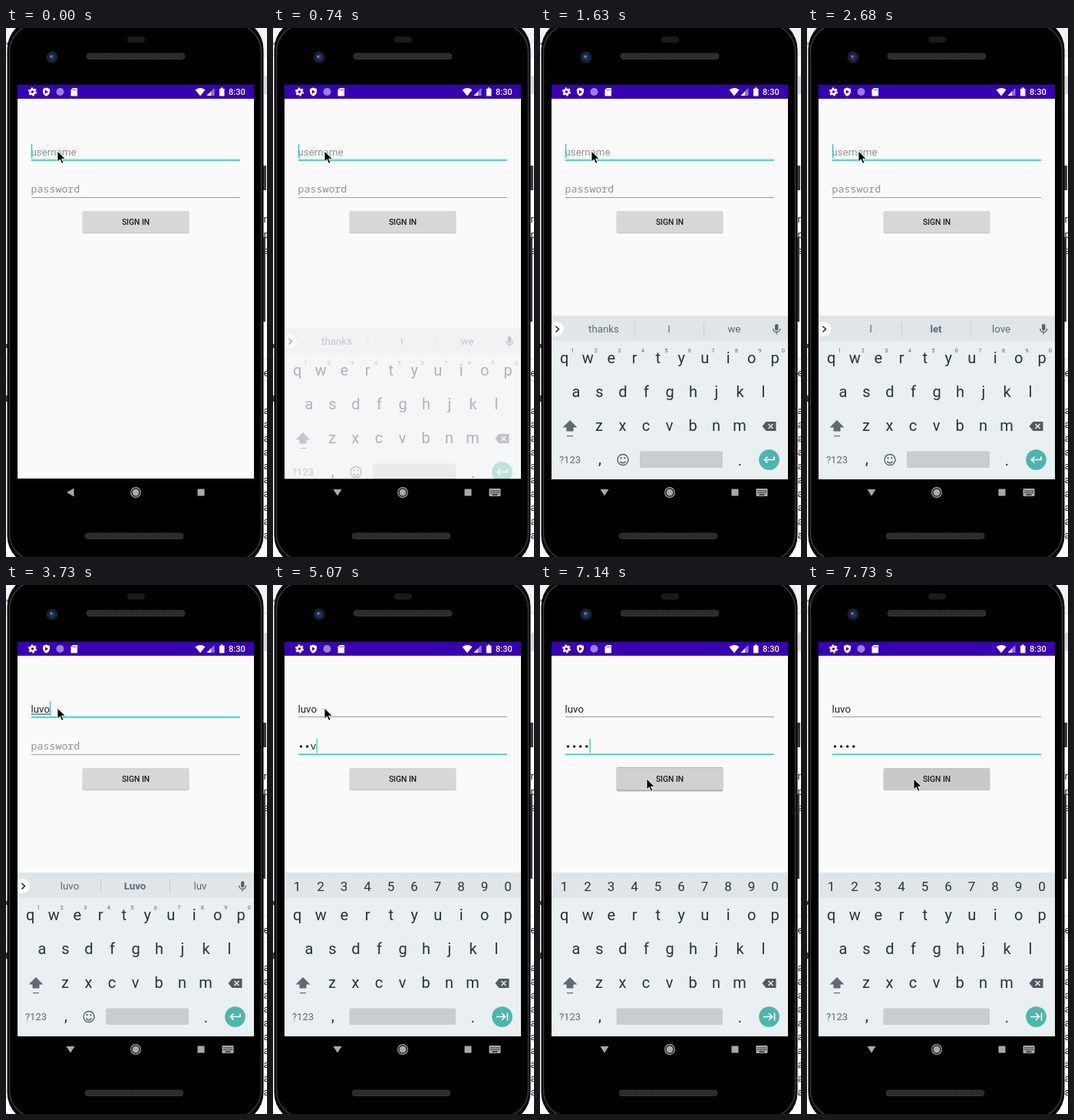
Recreate the animation shown at these times as an HTML page. Size 340 by 688 pixels, loop 8000 ms.

```html
<!DOCTYPE html>
<html lang="en">
<head>
<meta charset="utf-8">
<style>
html, body { margin: 0; width: 100%; height: 100%; overflow: hidden; background: #fff; }
svg { display: block; width: 100vw; height: 100vh; font-family: Roboto, sans-serif; }
.mono { font-family: "Noto Sans Mono", monospace; }
.mid { text-anchor: middle; }
.key { font-size: 20px; fill: #26343b; }
.word { font-size: 13.3px; fill: #5f6b72; }
.field { font-size: 13.3px; fill: #212121; }
.hint { font-size: 13.3px; fill: #929292; }
</style>
</head>
<body>
<svg viewBox="0 0 340 688">
  <defs>
    <clipPath id="screen"><path d="M15 74H323V587H15Z"/></clipPath>
    <pattern id="mesh" width="3" height="3" patternUnits="userSpaceOnUse">
      <path d="M0 0H3V3H0Z" fill="#2a2a2a"/><path d="M0 0H1V1H0Z" fill="#3c3c3c"/>
    </pattern>
  </defs>

  <!-- desktop behind the phone -->
  <path d="M0 0H340V36H0Z" fill="#f3f3f3"/>
  <path d="M0 36.5H340M0 430.5H340M0 458.5H340" stroke="#ddd"/>
  <path d="M0 19H6V22H0Z" fill="#5fc98a"/>
  <path d="M336 62H340V86H336Z" fill="#dcdcdc"/>
  <path d="M0 411H2V416H0ZM0 478H2V486H0Z" fill="#444"/>
  <g id="edge" font-size="13" fill="#222"></g>

  <!-- phone -->
  <path d="M334 179H339V211H334ZM334 272H338V382H334Z" fill="#3b3b3b"/>
  <rect x="1.5" y="-12" width="334" height="712" rx="40" fill="#050505"/>
  <rect x="4.5" y="-5" width="328" height="698" rx="36" fill="#000" stroke="#383838" stroke-width="1.5"/>
  <rect x="158" y="11" width="23" height="8" rx="4" fill="#1a1a1a"/>
  <rect x="105" y="33" width="128" height="7.500" rx="3.700" fill="url(#mesh)" stroke="#333"/>
  <rect x="103" y="657" width="128" height="7.500" rx="3.700" fill="url(#mesh)" stroke="#333"/>
  <circle cx="60" cy="38" r="7.500" fill="#1c2026"/>
  <circle cx="60" cy="38" r="4" fill="#1d3266"/>
  <circle cx="59" cy="37" r="1.500" fill="#6b8fd8"/>

  <!-- screen -->
  <path d="M15 74H323V92H15Z" fill="#3700b3"/>
  <path d="M15 92H323V586H15Z" fill="#fafafa"/>
  <g fill="#fff">
    <circle cx="34.500" cy="83" r="3" fill="none" stroke="#fff" stroke-width="2.600"/>
    <circle cx="34.500" cy="83" r="4.800" fill="none" stroke="#fff" stroke-width="1.600" stroke-dasharray="2.500 2.526"/>
    <path d="M52.500 77.500L57 79.300V83Q56.500 87 52.500 88.800Q48.500 87 48 83V79.300Z"/>
    <path d="M51 80.500L55 83L51 85.500Z" fill="#3700b3"/>
    <circle cx="70.500" cy="83" r="5" fill="#9a80d8"/>
    <path d="M87 78H93V88.500H84.500V80.500Z"/>
    <path d="M87.500 79.500V81.500M89.500 79.500V81.500M91.500 79.500V81.500" stroke="#3700b3" stroke-width=".8"/>
    <path d="M246.500 80.500Q253 75.500 259.500 80.500L253 88.500Z"/>
    <path d="M271.500 78V88H261.500Z" opacity=".45"/><path d="M267 82.500V88H261.500Z"/>
    <path d="M279.800 77.500H282.600V79H284.500V88.500H278V79H279.800Z"/>
    <text x="290" y="87" font-size="11" font-weight="500">8:30</text>
  </g>

  <text id="userHint" class="hint" x="32.500" y="166">username</text>
  <text id="user" class="field" x="32.500" y="166"></text>
  <path id="under" fill="#333"/>
  <text id="passHint" class="hint mono" x="32.500" y="214">password</text>
  <text id="passChar" class="field mono" y="214"></text>
  <g id="dots" fill="#212121"></g>
  <path id="userLine"/>
  <path id="passLine"/>
  <path id="caret" fill="#03cfbc"/>

  <rect id="shadow" x="99.500" width="139" rx="2" fill="#000"/>
  <rect id="button" x="100" y="238" width="138" height="28" rx="1"/>
  <text class="mid" x="169" y="256" font-size="10.300" font-weight="500" fill="#1c1c1c">SIGN IN</text>

  <!-- keyboard -->
  <g clip-path="url(#screen)"><g id="board">
    <path d="M15 374H323V600H15Z" fill="#eaeff2"/>
    <path d="M15 374H323V407H15Z" fill="#e0e5e9"/>
    <g id="keys"></g>
    <g id="nums"></g>
    <g id="plain">
      <g id="supers"></g>
      <path d="M123.500 382V400M213.500 382V400" stroke="#c6cdd1"/>
      <circle cx="21.500" cy="391.500" r="9.500" fill="#fff"/>
      <path d="M20.500 388L24.500 391.500L20.500 395.500" fill="none" stroke="#222" stroke-width="1.500"/>
      <text class="word mid" x="83" y="396"></text>
      <text class="word mid" x="168" y="396"></text>
      <text class="word mid" x="253" y="396"></text>
      <rect x="306" y="385" width="4.400" height="8.500" rx="2.200" fill="#566269"/>
      <path d="M303.700 391Q304 395.500 308.200 395.500T312.700 391M308.200 395.500V398.500" fill="none" stroke="#566269" stroke-width="1.300"/>
      <g fill="none" stroke="#566269" stroke-width="1.400">
        <circle cx="108" cy="561.500" r="7"/><path d="M104.300 563.500Q108 568 111.700 563.500"/>
      </g>
      <path d="M104.600 558.300H106.600V560.300H104.600ZM109.400 558.300H111.400V560.300H109.400Z" fill="#566269"/>
    </g>
    <path d="M39 510L48.500 519.500H43.500V524.500H34.500V519.500H29.500Z" fill="#5f6b72"/>
    <path d="M35 530H43V531.200H35Z" fill="#5f6b72"/>
    <path d="M294.500 512H307.500V524H294.500L289.500 518Z" fill="#4f5b62"/>
    <path d="M297.500 515L303.500 521M303.500 515L297.500 521" stroke="#eaeff2" stroke-width="1.500"/>
    <text class="mid" x="39" y="566" font-size="13" fill="#5f6b72">?123</text>
    <rect id="space" y="550.500" height="21.500" rx="2" fill="#c9cdd0"/>
    <circle cx="298.500" cy="561.500" r="13.300" fill="#4db6ac"/>
    <path id="enter" fill="none" stroke="#fff" stroke-width="1.700"/>
  </g></g>

  <!-- navigation bar -->
  <g fill="#a9a9a9">
    <path id="back"/>
    <circle cx="169" cy="604" r="6.300" fill="none" stroke="#a9a9a9" stroke-width="1.200"/>
    <circle cx="169" cy="604" r="4.500"/>
    <path d="M249.500 599.500H258.500V608.500H249.500Z"/>
    <g id="switcher">
      <rect x="281.500" y="599" width="15" height="10" rx="1"/>
      <path d="M283.500 601.800H295M283.500 604.300H295" stroke="#000" stroke-width="1.300" stroke-dasharray="1.300 1.200"/>
      <path d="M285.500 607H292.500" stroke="#000" stroke-width="1.200"/>
    </g>
  </g>

  <path id="mouse" d="M0 0V14L3.300 11L5.600 16.300L8 15.200L5.700 10.200H10.300Z" fill="#000" stroke="#fff" stroke-width=".9"/>
</svg>

<script>
const $ = id => document.getElementById(id);
const set = (id, attrs) => { for (const k in attrs) $(id).setAttribute(k, attrs[k]); };
const show = (id, on) => set(id, { visibility: on ? 'visible' : 'hidden' });
const words = document.querySelectorAll('.word');
const LOOP = 8000, NAME = 'luvo', PITCH = 8;

// Each track lists [start time, value...]; the latest started entry holds.
const at = (track, t) => track.findLast(s => s[0] <= t).slice(1);
const blink = [0, 150, 600, 1190, 1630, 2230, 2680, 5660, 6250, 6700, 7140, 7580];
const typing = [[0, 0], [2830, 1], [3130, 2], [3430, 3], [3730, 4]];
const secret = [[0, 0], [4620, 1], [4770, 2], [5070, 3], [5220, 4]];
const slide = [[0, 30, 0], [600, 16, .35], [750, 5, .85], [890, 1, .97], [1040, 0, 1]];
const guesses = [
  [0, 'thanks', 'I', 'we'], [2680, 'l', 'let', 'love'], [3130, 'lu', 'luck', 'lunch'],
  [3430, 'luv', 'love', 'luck'], [3730, 'luvo', 'Luvo', 'luv']
];
const mouse = [[0, 67, 160], [5370, 90, 190], [5510, 124, 234], [5660, 138, 251], [5950, 139, 252]];
const press = [
  [0, '#d6d7d7', 0], [6250, '#d0d1d1', 1], [6550, '#c9caca', 1], [6700, '#d6d7d7', 0],
  [7140, '#d0d1d1', 1], [7580, '#c9caca', 1], [7730, '#c8c9c9', 0]
];

const row = (chars, x, y, size, color) => [...chars].map((c, i) =>
  `<text class="mid" x="${x + 30.5 * i}" y="${y}" font-size="${size}" fill="${color}">${c}</text>`).join('');
const INK = '#26343b';
$('keys').innerHTML = row('qwertyuiop', 31.7, 435.5, 20, INK) + row('asdfghjkl', 47, 480, 20, INK) +
  row('zxcvbnm', 77, 524, 20, INK) + '<text class="key mid" x="78" y="567">,</text><text class="key mid" x="260.500" y="569">.</text>';
$('nums').innerHTML = row('1234567890', 31.5, 398, 17, INK);
$('supers').innerHTML = row('1234567890', 42.3, 421.5, 7.5, '#5f6b72');
$('dots').innerHTML = [0, 1, 2, 3].map(i => `<circle cx="${36.5 + 8.1 * i}" cy="210" r="1.800"/>`).join('');
$('edge').innerHTML = [['r', 253], ['p', 273], ['a', 294], ['e', 453],
  ...Array.from({ length: 10 }, (_, i) => ['a', 502 + 18 * i])]
  .map(([c, y]) => `<text x="335.500" y="${y}">${c}</text>`).join('');

function line(id, y, active) {
  set(id, { d: `M33 ${y}H305v${active ? 1.7 : 1}H33Z`, fill: active ? '#1fd8c6' : '#9c9c9c' });
}

function draw(t) {
  const onPass = t >= 4180, masked = t >= 6700;
  const [typed] = at(typing, t), [count] = at(secret, t);

  $('user').textContent = NAME.slice(0, typed);
  const width = typed ? $('user').getComputedTextLength() : 0;
  show('userHint', !typed);
  set('under', { d: `M33 167.500h${width}v1h${-width}Z` });
  show('under', typed && !onPass);
  line('userLine', 171, !onPass);
  line('passLine', onPass ? 219.5 : 220, onPass);

  show('passHint', !count);
  $('passChar').textContent = masked || !count ? '' : NAME[count - 1];
  set('passChar', { x: 32.5 + PITCH * (count - 1) });
  [...$('dots').children].forEach((dot, i) =>
    dot.setAttribute('visibility', i < (masked ? count : count - 1) ? 'visible' : 'hidden'));

  const x = onPass ? 32.5 + PITCH * count : Math.round(32.5 + width);
  set('caret', { d: `M${x} ${onPass ? 200 : 151}h1.200v18.500h-1.200Z` });
  show('caret', blink.filter(b => b <= t).length % 2);

  const [color, raised] = at(press, t);
  set('button', { fill: color });
  set('shadow', { y: raised ? 237 : 239, height: raised ? 31.5 : 28.2, opacity: raised ? .28 : .2 });

  const [dy, alpha] = at(slide, t), open = t >= 600;
  set('board', { transform: `translate(0 ${dy})`, opacity: alpha });
  show('nums', onPass);
  show('plain', !onPass);
  at(guesses, t).forEach((w, i) => {
    words[i].textContent = w;
    words[i].setAttribute('font-weight', i === 1 && t >= 2680 ? 700 : 400);
  });
  set('space', { x: onPass ? 99.5 : 130, width: onPass ? 138.5 : 108 });
  set('enter', { d: onPass
    ? 'M291 561.500H302M298 557L302.500 561.500L298 566M305.500 556.500V566.500'
    : 'M305 557.500V561.500H292.500M296.500 557.500L292.500 561.500L296.500 565.500' });
  set('back', { d: open ? 'M78.500 600H89.500L84 608.500Z' : 'M88.500 598.500V609.500L79 604Z' });
  show('switcher', open);

  set('mouse', { transform: `translate(${at(mouse, t)})` });
}

const start = performance.now();
function tick() {
  draw((performance.now() - start) % LOOP);
  requestAnimationFrame(tick);
}
tick();
</script>
</body>
</html>
```
